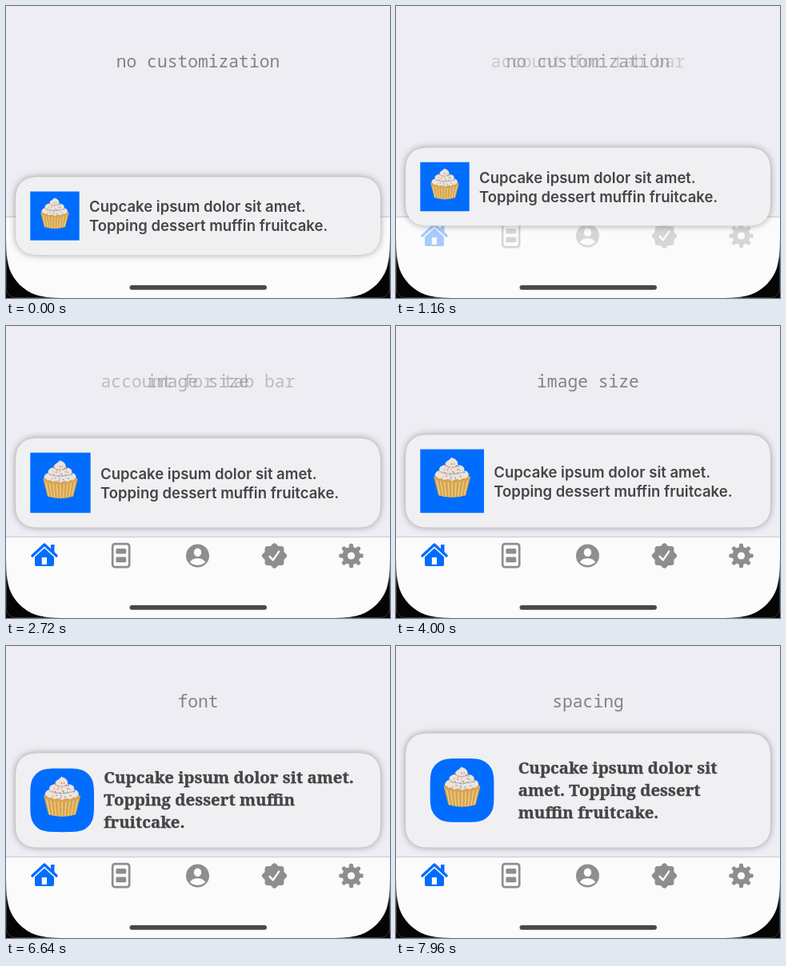
Write an HTML page that moves like this. It is 480 by 366 pixels and loops after 8 s.

```html
<!DOCTYPE html>
<html lang="en">
<head>
<meta charset="utf-8">
<style>
html, body { margin: 0; width: 100%; height: 100%; overflow: hidden; background: #050505; }
svg { display: block; width: 100%; height: 100%; }
.title { font: 21.3px "Noto Sans Mono", monospace; fill: #828286; text-anchor: middle; }
.sans { font: 600 18.5px Inter, sans-serif; }
.slab { font: 700 20.4px "Noto Serif", serif; stroke: #454548; stroke-width: .4px; }
#copy { fill: #454548; }
#card { fill: #f0f0f2; filter: drop-shadow(0 0 4.2px rgba(0, 0, 0, .36)); }
</style>
</head>
<body>
<svg viewBox="0 0 480 366">
  <rect x=".5" y="-40" width="479" height="405.5" rx="11" fill="none" stroke="#3c3c3c"/>
  <path id="screen" fill="#fbfbfb"/>
  <path fill="#eeedf3" d="M0 0H480V264H0z"/>
  <path stroke="#c9c9cc" d="M0 264.5H480"/>

  <g id="tabs" fill="#8e8e90">
    <g fill="#006dff">
      <path d="M33 288 48 274 63 288" fill="none" stroke="#006dff" stroke-width="3.4" stroke-linecap="round" stroke-linejoin="round"/>
      <path d="M56 274H60.5V284L56 280z"/>
      <path fill-rule="evenodd" d="M48 278.5 60 289.5V299Q60 301 58 301H38Q36 301 36 299V289.5zM44.8 290V299H51V290z"/>
    </g>
    <rect x="133.2" y="273.2" width="21" height="29" rx="3" fill="none" stroke="#8e8e90" stroke-width="2.7"/>
    <rect x="137.4" y="279" width="12.8" height="6.6" rx="1.5"/>
    <rect x="137.4" y="289.6" width="12.8" height="6.6" rx="1.5"/>
    <circle cx="239.5" cy="288" r="14.5"/>
    <g fill="#fbfbfb">
      <ellipse cx="239.5" cy="283.8" rx="4.7" ry="5.3"/>
      <path d="M230 296.5C231.5 289.5 247.5 289.5 249 296.5Q239.5 303.5 230 296.5z"/>
    </g>
    <path id="seal" transform="translate(335.5 288)"/>
    <path d="M329.6 288.8 333.8 293.4 341.2 282.6" fill="none" stroke="#fbfbfb" stroke-width="2.5" stroke-linecap="round" stroke-linejoin="round"/>
    <path id="gear" transform="translate(431.5 288)"/>
    <circle cx="431.5" cy="288" r="4.6" fill="#fbfbfb"/>
  </g>

  <rect x="154.5" y="349.9" width="171.5" height="5.8" rx="2.9" fill="#48484a"/>
  <g id="titles"></g>

  <path id="card"/>
  <path id="tile" fill="#006dff"/>
  <g id="cupcake">
    <path fill="#ece3df" d="M-21 -4C-23 -9 -19 -13 -16 -13C-17 -18 -12 -20 -9 -20C-9 -25 -4 -25 -1 -29.500C4 -28 8 -25 7 -20C13 -20 16 -17 15 -13C20 -13 22 -8 20 -4L0 4z"/>
    <path fill="none" stroke="#c3b5ae" stroke-width="1.400" d="M-16 -12Q0 -5 16 -12M-9 -19.500Q0 -15 8 -19.500"/>
    <g id="sprinkles"></g>
    <path fill="#d7a550" d="M-23 -5Q-20 -8 -17 -3Q-13 -5 -10 -1Q-5 -4 0 0Q5 -4 10 -1Q13 -5 17 -3Q20 -8 23 -5L17 18Q0 23.500 -17 18z"/>
    <path id="pleats" fill="none" stroke="#efd08a" stroke-width="1.3"/>
  </g>
  <g id="copy"></g>
</svg>
<script>
const NS = "http://www.w3.org/2000/svg";
const $ = id => document.getElementById(id);
const set = (el, attrs) => { for (const k in attrs) el.setAttribute(k, attrs[k]); };
function add(parent, tag, attrs, text = "") {
  const el = parent.appendChild(document.createElementNS(NS, tag));
  set(el, attrs);
  el.textContent = text;
  return el;
}

// Rectangle whose corners bend with continuous curvature
function squircle(x, y, w, h, r) {
  const corner = (cx, cy, dx, dy) => {
    const p = (a, b) => `${cx - dx * a * r - dy * b * r} ${cy - dy * a * r + dx * b * r} `;
    return p(1.529, 0) + "C" + p(1.088, 0) + p(.868, 0) + p(.631, .075) +
      p(.373, .169) + p(.169, .373) + p(.075, .631) + p(0, .868) + p(0, 1.088) + p(0, 1.529);
  };
  return "M" + [
    corner(x + w, y, 1, 0), corner(x + w, y + h, 0, 1),
    corner(x, y + h, -1, 0), corner(x, y, 0, -1)
  ].join("L") + "z";
}
set($("screen"), { d: squircle(0, -200, 480, 566, 58) });

// Closed outline around the origin, radius given per angle
function outline(radius) {
  const pts = [];
  for (let i = 0; i < 180; i++) {
    const a = i * Math.PI / 90, r = radius(a);
    pts.push((r * Math.sin(a)).toFixed(2) + " " + (-r * Math.cos(a)).toFixed(2));
  }
  return "M" + pts.join("L") + "z";
}
set($("seal"), { d: outline(a => 14.4 + 1.3 * Math.cos(8 * a)) });
set($("gear"), { d: outline(a => 13.1 + 2.1 * Math.tanh(3 * Math.cos(8 * a))) });

let pleats = "";
for (let i = -4; i <= 4; i++) pleats += `M${i * 4.8} ${2 - i * i * .2}L${i * 3.8} ${20 - i * i * .12}`;
set($("pleats"), { d: pleats });

const candy = ["#e0574f", "#4a9fd8", "#e7a63c", "#68b56a", "#c56bb5"];
for (let i = 0; i < 24; i++) {
  const r = Math.sqrt(i / 24), a = i * 2.4;
  add($("sprinkles"), "rect", {
    width: 2.2, height: 1.1, rx: .5, fill: candy[i % 5],
    transform: `translate(${r * 15 * Math.cos(a)} ${-12 + r * 11 * Math.sin(a)}) rotate(${i * 67})`
  });
}

const titles = ["no customization", "account for tab bar", "image size", "corner radius", "font", "spacing"]
  .map(s => add($("titles"), "text", { class: "title", x: 240, y: 77 }, s));

function block(cls, top, step, lines) {
  const g = add($("copy"), "g", { class: cls });
  lines.forEach((s, i) => add(g, "text", { y: top + i * step }, s));
  return g;
}
const copies = [
  block("sans", -4.8, 24, ["Cupcake ipsum dolor sit amet.", "Topping dessert muffin fruitcake."]),
  block("slab", -21, 28, ["Cupcake ipsum dolor sit amet.", "Topping dessert muffin", "fruitcake."]),
  block("slab", -21, 28, ["Cupcake ipsum dolor sit", "amet. Topping dessert", "muffin fruitcake."])
];

const LOOP = 8, STEP = 1.5, FIRST = -.5, FADE = .42;
const mix = (a, b, p) => a + (b - a) * p;

// Critically damped spring with a response of half a second
function spring(t) {
  const w = Math.max(0, t) * 4 * Math.PI;
  return 1 - (1 + w) * Math.exp(-w);
}
function ease(t) {
  const p = Math.min(1, Math.max(0, t / FADE));
  return p * p * (3 - 2 * p);
}

function draw(t) {
  const since = titles.map((_, i) => t - FIRST - i * STEP);
  const [shown, tab, sized, round, font, space] = since.map(spring);
  const fade = since.map(ease);

  titles.forEach((el, i) => set(el, { opacity: fade[i] * (1 - (fade[i + 1] || 0)) }));
  set($("tabs"), { opacity: fade[1] });
  [1 - fade[4], fade[4] * (1 - fade[5]), fade[5]].forEach((o, i) => set(copies[i], { opacity: o }));

  const size = mix(61.4, 79.7, sized);
  const pad = mix(18.3, 30.7, space);
  const gap = mix(12.3, 30.3, space);
  const height = mix(size, 81.7, font) + 2 * pad;
  const bottom = mix(470, mix(310, 252.5, tab), shown);
  const mid = bottom - height / 2;
  const left = 12 + pad;

  set($("card"), { d: squircle(12, bottom - height, 456, height, 24.6) });
  set($("tile"), { d: squircle(left, mid - size / 2, size, size, 24.6 * round) });
  set($("cupcake"), { transform: `translate(${left + size / 2} ${mid}) scale(${size / 79.7})` });
  set($("copy"), { transform: `translate(${left + size + gap} ${mid})` });
}

function tick() {
  draw(performance.now() / 1000 % LOOP);
  requestAnimationFrame(tick);
}
tick();
</script>
</body>
</html>
```
